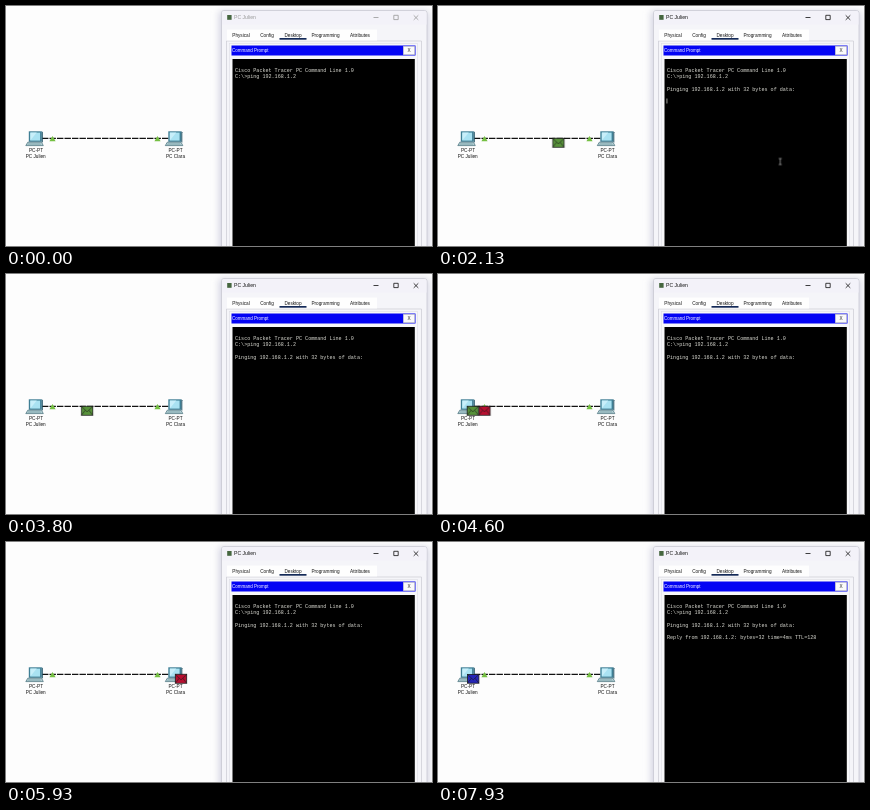
An HTML page for the animation above (8000 ms loop, 426 by 240 pixels).

```html
<!DOCTYPE html>
<html lang="en">
<head>
<meta charset="utf-8">
<title>Ping simulation</title>
<style>
  html, body { margin: 0; height: 100%; overflow: hidden; background: #fdfdfd; }
  svg { display: block; width: 100vw; height: 100vh; font: 4.7px "Liberation Sans", Arial, sans-serif; }
  .mid { text-anchor: middle; }
  .console { font: 5.08px "Liberation Mono", monospace; fill: #dcdcd4; white-space: pre; }

  /* One loop is 8 s, so 1% is 80 ms. */
  .show, .move { animation: 8s infinite; }
  .show { animation-timing-function: step-end; }
  .move { animation-timing-function: linear; }

  .idle { animation-name: idle; }
  .active { animation-name: active; }
  @keyframes idle { 0% { visibility: visible } 6.5%, 100% { visibility: hidden } }
  @keyframes active { 0% { visibility: hidden } 6.5%, 100% { visibility: visible } }

  .reply { animation-name: reply; }
  @keyframes reply { 0% { visibility: hidden } 86%, 100% { visibility: visible } }

  .caret1 { animation-name: caret1; }
  @keyframes caret1 {
    0%, 16.2%, 29.5%, 42.7%, 56%, 69.2%, 82.5%, 100% { visibility: hidden }
    9.4%, 22.8%, 36.1%, 49.3%, 62.6%, 75.9% { visibility: visible }
  }
  .caret2 { animation-name: caret2; }
  @keyframes caret2 { 0%, 92.6%, 100% { visibility: hidden } 86% { visibility: visible } }

  .green { animation-name: green-on; }
  .green .move { animation-name: green-path; }
  @keyframes green-on { 0%, 61.25%, 100% { visibility: hidden } 12.5% { visibility: visible } }
  @keyframes green-path {
    0%, 21.25% { transform: translate(46.2px, 136.8px) }
    30.6%, 41.25% { transform: translate(175px, 136.8px) }
    50.6%, 100% { transform: translate(34.8px, 136.8px) }
  }

  .red { animation-name: red-on; }
  .red .move { animation-name: red-path; }
  @keyframes red-on {
    0%, 21.25%, 92.5%, 100% { visibility: hidden }
    12.5%, 50.6% { visibility: visible }
  }
  @keyframes red-path {
    0%, 30% { transform: translate(34.8px, 136.8px) }
    30.01%, 61.25% { transform: translate(46.5px, 136.8px) }
    70%, 77% { transform: translate(175px, 136.8px) }
    86%, 100% { transform: translate(35.2px, 136px) }
  }

  .blue { animation-name: blue-on; }
  @keyframes blue-on { 0% { visibility: hidden } 93%, 100% { visibility: visible } }

  .pointer { animation-name: pointer-on; }
  .pointer .move { animation-name: pointer-path; }
  @keyframes pointer-on { 0%, 45%, 100% { visibility: hidden } 8.5% { visibility: visible } }
  @keyframes pointer-path {
    0%, 19% { transform: translate(401px, 110px); animation-timing-function: ease-in-out }
    30%, 100% { transform: translate(328px, 166.5px) }
  }
</style>
</head>
<body>
<svg viewBox="0 0 426 240" preserveAspectRatio="none">
  <defs>
    <g id="pc">
      <path d="M-6.5 -7.5H6.5V3H-6.5Z" fill="#3f7f95"/>
      <path d="M-5 -6.2H4.8V1.8H-5Z" fill="#a9e2f2"/>
      <path d="M-5 1.8V-6.2H1.5Z" fill="#c8effa"/>
      <path d="M6.5 -7.5L7.5 -6.5V4L6.5 3Z" fill="#245366"/>
      <path d="M-7.5 3.4H6.2L8 6.8H-9.5Z" fill="#bcd6da" stroke="#3d6874" stroke-width=".7"/>
      <path d="M-7.2 4.6H5.4M-8 5.8H6" stroke="#6d959f" stroke-width=".5"/>
    </g>
    <g id="mail" stroke="#1c1c1c" stroke-width=".8">
      <rect x="-5.7" y="-4.4" width="11.4" height="8.8"/>
      <path d="M-5.7 -4.4L0 1L5.7 -4.4M-5.7 4.4L-1.8 -.6M5.7 4.4L1.8 -.6" fill="none" stroke-opacity=".75"/>
    </g>
    <path id="link-up" d="M-3.1 2.4L0 -2.8L3.1 2.4Z" fill="#76c043"/>
    <g id="title">
      <text x="228" y="13.2" font-size="5.1">PC Julien</text>
      <path d="M367.5 11.5H372.5M387.8 9.3H392.2V13.6H387.8ZM407.7 9.3L412.3 13.9M412.3 9.3L407.7 13.9"
            fill="none" stroke="currentColor" stroke-width=".8"/>
    </g>
    <filter id="soft" x="-10%" y="-10%" width="120%" height="120%"><feGaussianBlur stdDeviation="3.5"/></filter>
  </defs>

  <rect width="426" height="240" fill="#fdfdfd"/>

  <!-- Network -->
  <path d="M36 132.4H163" stroke="#111" stroke-width="1.2" stroke-dasharray="6.4 1.1"/>
  <use href="#link-up" x="46.5" y="132.9"/>
  <use href="#link-up" x="151.5" y="132.9"/>
  <use href="#pc" x="29.3" y="132.8"/>
  <use href="#pc" x="168.8" y="132.8"/>
  <g class="mid" fill="#111">
    <text x="30" y="145.9">PC-PT</text>
    <text x="29.7" y="152">PC Julien</text>
    <text x="169.5" y="145.9">PC-PT</text>
    <text x="169.5" y="152">PC Clara</text>
  </g>

  <g class="show red" fill="#b80f30"><use class="move" href="#mail"/></g>
  <g class="show green" fill="#57923a"><use class="move" href="#mail"/></g>
  <g class="show blue" fill="#2626b8"><use href="#mail" x="35.2" y="136.8"/></g>

  <!-- Window -->
  <rect x="213" y="5" width="210" height="250" fill="#d3d3e2" filter="url(#soft)"/>
  <rect x="215.5" y="4.5" width="205.5" height="250" rx="2.5" fill="#f5f5f9" stroke="#c5c5cf" stroke-width=".7"/>
  <path d="M216 18.5V7Q216 5 218 5H418.5Q420.5 5 420.5 7V18.5Z" fill="#f3f2f9"/>
  <rect x="221.2" y="9" width="4.4" height="4.8" fill="#45663f"/>
  <use class="show idle" href="#title" fill="#999" color="#999"/>
  <use class="show active" href="#title" fill="#111" color="#111"/>

  <path d="M220.5 240V35H415.5V240" fill="none" stroke="#cbcbd3" stroke-width=".7"/>
  <rect x="221" y="23.5" width="150" height="11" fill="#fefefe"/>
  <g class="mid" fill="#151515">
    <text x="235" y="30.6">Physical</text>
    <text x="261" y="30.6">Config</text>
    <text x="287" y="30.6">Desktop</text>
    <text x="319.5" y="30.6">Programming</text>
    <text x="354" y="30.6">Attributes</text>
  </g>
  <rect x="273.5" y="32" width="27" height="1.7" fill="#142a58"/>

  <rect x="223.5" y="37.5" width="188" height="210" fill="#f7f7f9" stroke="#dedee4" stroke-width=".6"/>
  <rect x="225.5" y="39.5" width="184" height="10" fill="#0404f4"/>
  <text x="226" y="46.2" font-size="4.5" fill="#fff">Command Prompt</text>
  <rect x="397.2" y="40.2" width="11.6" height="8.6" fill="#fafafa" stroke="#aaa" stroke-width=".4"/>
  <text class="mid" x="403" y="46.2" fill="#222">X</text>

  <!-- Console -->
  <rect x="226.5" y="53" width="182.3" height="187" fill="#000"/>
  <g class="console">
    <text x="229" y="66.2">Cisco Packet Tracer PC Command Line 1.0</text>
    <text x="229" y="72.3">C:\&gt;ping 192.168.1.2</text>
    <text class="show active" x="229" y="84.6">Pinging 192.168.1.2 with 32 bytes of data:</text>
    <text class="show reply" x="229" y="96.9">Reply from 192.168.1.2: bytes=32 time=4ms TTL=128</text>
    <rect class="show caret1" x="228.6" y="92.5" width=".7" height="5"/>
    <rect class="show caret2" x="228.6" y="98.7" width=".7" height="5"/>
  </g>
  <g class="show pointer">
    <path class="move" d="M-1.5 -3H1.5M0 -3V3M-1.5 3H1.5" fill="none" stroke="#b5b5b5" stroke-width=".7"/>
  </g>
</svg>
</body>
</html>
```
